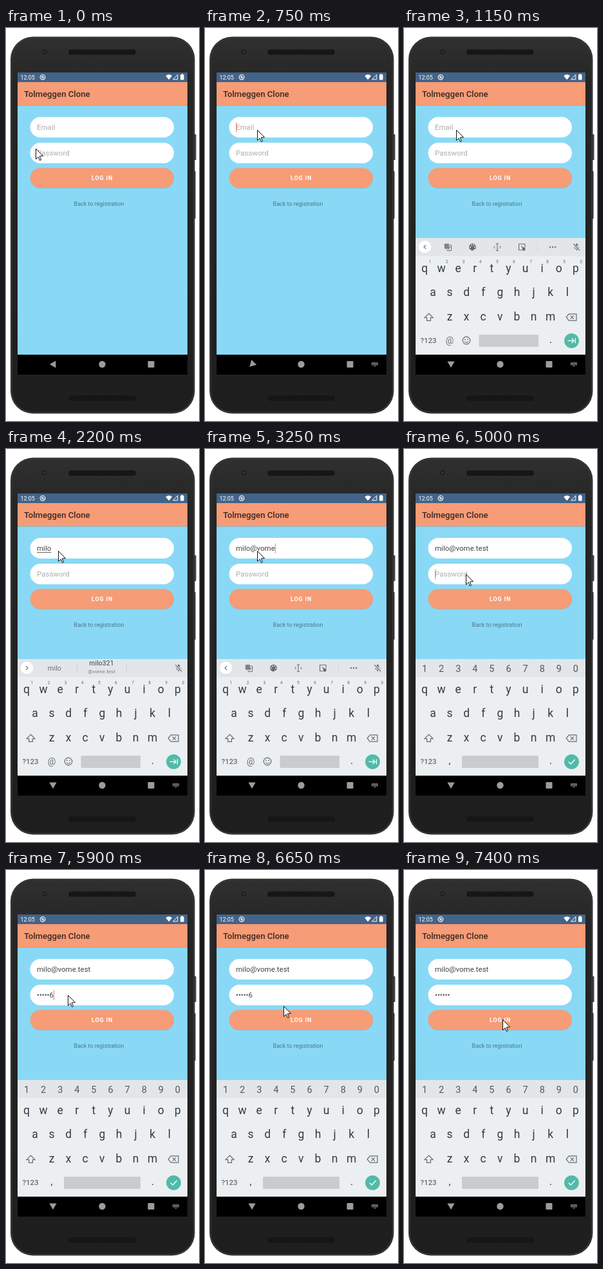
An HTML page with a canvas that plays this animation: 300 px wide and 610 px high, repeating every 8000 ms.

```html
<!DOCTYPE html>
<html lang="en">
<head>
<meta charset="utf-8">
<title>Login demo</title>
<style>
  html, body { margin: 0; width: 100%; height: 100%; overflow: hidden; background: #fff; }
  canvas { display: block; width: 300px; height: 610px; }
</style>
</head>
<body>
<canvas id="stage"></canvas>
<script>
const LOOP = 8000, STEP = 50;
const canvas = document.getElementById('stage');
const ctx = canvas.getContext('2d');
const dpr = window.devicePixelRatio || 1;
canvas.width = 300 * dpr;
canvas.height = 610 * dpr;

const ORANGE = '#f69c76', SKY = '#89d9f6', INK = '#343b3f', GREY = '#666d71';
const HINT = '#adadad', ENTRY = '#444';
const NAV_TOP = 507;

// Each entry is the time at which the next character lands.
const EMAIL = 'milo@vome.test';
const emailTimes = [1600, 1650, 1700, 1750, 2600, 2850, 2950, 3100, 3250, 3400, 3550, 3650, 3700, 3800];
const PASS = '123456';
const passTimes = [5500, 5600, 5750, 5800, 5850, 5900];
const FOCUS_EMAIL = 700, FOCUS_PASS = 4950, PASS_KEYS = 5000;
const resets = [FOCUS_EMAIL, ...emailTimes, FOCUS_PASS, ...passTimes];

const moves = [
  { from: 50, to: 600, a: [46, 187], b: [81, 158] },
  { from: 4450, to: 4950, a: [81, 158], b: [96, 194] },
  { from: 6300, to: 7050, a: [96, 194], b: [153, 232] }
];

const clamp = v => Math.max(0, Math.min(1, v));
const span = (t, a, b) => clamp((t - a) / (b - a));
const smooth = p => p * p * (3 - 2 * p);
const typed = (times, t) => times.filter(x => x <= t).length;

function box(x, y, w, h, r, fill) {
  ctx.beginPath();
  ctx.roundRect(x, y, w, h, r);
  ctx.fillStyle = fill;
  ctx.fill();
}

function disc(x, y, r, fill) {
  ctx.beginPath();
  ctx.arc(x, y, r, 0, Math.PI * 2);
  ctx.fillStyle = fill;
  ctx.fill();
}

function arc(x, y, r, from, to, color, width = 1) {
  ctx.beginPath();
  ctx.arc(x, y, r, from, to);
  ctx.strokeStyle = color;
  ctx.lineWidth = width;
  ctx.stroke();
}

const ring = (x, y, r, color, width) => arc(x, y, r, 0, Math.PI * 2, color, width);

function trace(points, close) {
  ctx.beginPath();
  points.forEach(([x, y], i) => i ? ctx.lineTo(x, y) : ctx.moveTo(x, y));
  if (close) ctx.closePath();
}

function line(points, color, width = 1, close = false) {
  trace(points, close);
  ctx.strokeStyle = color;
  ctx.lineWidth = width;
  ctx.stroke();
}

function poly(points, fill) {
  trace(points, true);
  ctx.fillStyle = fill;
  ctx.fill();
}

function text(s, x, y, size, color, { weight = 400, align = 'left', spacing = 0 } = {}) {
  ctx.font = `${weight} ${size}px Roboto, Arial, sans-serif`;
  ctx.letterSpacing = spacing + 'px';
  ctx.textAlign = align;
  ctx.fillStyle = color;
  ctx.fillText(s, x, y);
  const width = ctx.measureText(s).width;
  ctx.letterSpacing = '0px';
  return width;
}

const label = (s, x, y, size, color, weight) => text(s, x, y, size, color, { align: 'center', weight });

function drawPhone() {
  box(291, 165, 4.6, 40, 1, '#454545');
  box(291, 222, 3.6, 74, 1, '#333');
  const shell = ctx.createLinearGradient(0, 13, 0, 599);
  shell.addColorStop(0, '#303030');
  shell.addColorStop(0.12, '#262626');
  shell.addColorStop(1, '#1e1e1e');
  box(7, 13.5, 286.5, 585, 35, '#2a2a2a');
  box(8, 14.5, 284.5, 583, 34, '#383838');
  box(9.5, 16, 281.5, 580, 32.5, shell);
  disc(60, 37, 3.6, '#1d1d1d');
  disc(60, 37, 1.5, '#3c4044');
  for (const y of [33.5, 570.5]) {
    box(97.5, y, 104, 8, 3, '#141414');
    ctx.fillStyle = '#262626';
    for (let x = 100; x < 199; x += 3) {
      ctx.fillRect(x, y + 2, 1, 1);
      ctx.fillRect(x + 1.5, y + 5, 1, 1);
    }
  }
}

function drawStatus() {
  ctx.fillStyle = '#436389';
  ctx.fillRect(18, 69, 264, 15);
  text('12:05', 22.5, 79.7, 9, '#fff');
  ring(57, 76.3, 3.8, '#fff', 1.2);
  ring(57, 76.3, 1.4, '#fff', 1);
  line([[54.8, 74], [59.2, 78.6]], '#fff', 0.9);
  ctx.beginPath();
  ctx.moveTo(253.2, 80.3);
  ctx.lineTo(248.2, 74.2);
  ctx.quadraticCurveTo(253.2, 70.2, 258.2, 74.2);
  ctx.closePath();
  ctx.fillStyle = '#fff';
  ctx.fill();
  line([[266.8, 72.4], [266.8, 79.8], [259.6, 79.8]], '#fff', 1, true);
  box(271, 72.3, 5.6, 8.2, 0.8, '#fff');
  ctx.fillRect(272.6, 71.3, 2.4, 1.4);
}

function drawPage(t) {
  ctx.fillStyle = SKY;
  ctx.fillRect(18, 84, 264, NAV_TOP - 84);
  ctx.fillStyle = 'rgba(60,90,100,.22)';
  ctx.fillRect(18, 120, 264, 1);
  ctx.fillStyle = ORANGE;
  ctx.fillRect(18, 84, 264, 36);
  text('Tolmeggen Clone', 28, 106.7, 13.2, '#3c2923', { weight: 500 });

  box(37.5, 138, 223.5, 32, 16, '#fff');
  box(37.5, 178, 223.5, 32, 16, '#fff');
  box(38, 218, 223, 31, 15.5, 'rgba(50,90,110,.2)');
  box(37.5, 217.3, 223.5, 31, 15.5, ORANGE);
  text('LOG IN', 133, 236.3, 9, '#fff', { weight: 700, spacing: 0.85 });
  label('Back to registration', 144.5, 276.2, 9, '#4b7687');

  drawFields(t);
}

function drawFields(t) {
  const count = typed(emailTimes, t);
  const passCount = typed(passTimes, t);
  let emailW = 0, passW = 0;
  if (count) {
    emailW = text(EMAIL.slice(0, count), 48, 158.4, 11.5, ENTRY);
    if (count < 5) {
      ctx.fillStyle = '#666';
      ctx.fillRect(48, 160, emailW, 1);
    }
  } else {
    text('Email', 48, 158.4, 11.5, HINT);
  }
  if (passCount) {
    const shown = t < passTimes[passCount - 1] + 1500;
    const dots = '•'.repeat(passCount - (shown ? 1 : 0));
    passW = text(dots + (shown ? PASS[passCount - 1] : ''), 48, 198.4, 11.5, ENTRY);
  } else {
    text('Password', 48, 198.4, 11.5, HINT);
  }

  const last = resets.filter(x => x <= t).pop();
  if (last === undefined || t < 750 || t >= 7400 || (t - last) % 1000 >= 450) return;
  const inPass = t >= FOCUS_PASS;
  ctx.fillStyle = '#ee8f86';
  ctx.fillRect(48 + (inPass ? passW : emailW), inPass ? 186.5 : 146.5, 1.2, 15.5);
}

function drawNav(t) {
  ctx.fillStyle = '#000';
  ctx.fillRect(18, NAV_TOP, 264, 538 - NAV_TOP);
  const turn = t < 750 ? 0 : t < 850 ? 0.5 : 0.5 + 0.5 * span(t, 800, 950);
  ctx.save();
  ctx.translate(73, 522);
  ctx.rotate(-turn * Math.PI / 2);
  poly([[-5.2, 0], [4.4, -5.6], [4.4, 5.6]], '#9c9c9c');
  ctx.restore();
  disc(149.5, 522, 5.2, '#9c9c9c');
  box(220.5, 517, 10, 10, 1, '#9c9c9c');
  if (t < 750) return;
  box(259, 519, 10, 4.6, 0.6, '#777');
  ctx.fillStyle = '#111';
  for (let i = 0; i < 4; i++) {
    ctx.fillRect(260.2 + i * 2.2, 520, 1, 1);
    ctx.fillRect(260.2 + i * 2.2, 521.8, 1, 1);
  }
  poly([[262, 524.3], [266, 524.3], [264, 526.3]], '#777');
}

function drawMic() {
  box(266.6, 334.5, 3.6, 6.5, 1.8, GREY);
  arc(268.4, 339.5, 3.8, 0.1, Math.PI - 0.1, GREY);
  line([[268.4, 343], [268.4, 345.5]], GREY);
  line([[263.8, 334.6], [273.6, 345]], '#e3e6e8', 2.4);
  line([[263.4, 335], [273.2, 345.4]], GREY, 1.1);
}

function drawTools() {
  box(62.8, 334.8, 7.2, 8, 0.8, '#7d8386');
  line([[70.6, 337], [73.6, 337], [73.6, 345.6], [67.5, 345.6], [66.6, 343.6]], GREY);
  line([[69.6, 340], [72.4, 340]], GREY, 0.9);
  line([[71.6, 340], [69.2, 344]], GREY, 0.9);

  disc(106.5, 340, 5.4, GREY);
  for (const [x, y] of [[103.2, 340], [105, 337], [108.2, 337], [110, 340], [109, 344.2]])
    disc(x, y, 1, '#e3e6e8');

  line([[145, 335], [145, 345.5]], GREY, 1.1);
  line([[143, 334.8], [147, 334.8]], GREY);
  line([[143, 345.6], [147, 345.6]], GREY);
  line([[141.6, 338.2], [139.8, 340.2], [141.6, 342.2]], GREY);
  line([[148.4, 338.2], [150.2, 340.2], [148.4, 342.2]], GREY);

  line([[188, 340], [188, 335.2], [178.6, 335.2], [178.6, 344.8], [183, 344.8]], GREY, 1.1);
  box(183.8, 340.6, 4.6, 5, 1, GREY);
  line([[182.4, 338.4], [185.4, 342]], GREY, 1.2);

  ctx.fillStyle = '#d5d8da';
  ctx.fillRect(207, 332, 1, 16);
  for (const x of [227, 231, 235]) disc(x, 340, 1.2, GREY);
}

function drawStrip(t) {
  const suggest = t >= 2100 && t < 2600;
  disc(32.5, 340.4, 10, '#d3d6d8');
  disc(32.5, 339.8, 9.8, '#fff');
  const d = suggest ? 1.5 : -1.5;
  line([[32.5 - d, 336.8], [32.5 + d, 339.8], [32.5 - d, 342.8]], GREY, 1.2);
  drawMic();
  if (!suggest) return drawTools();
  label('milo', 75.5, 344, 11, '#697176');
  label('milo321', 148.5, 336.4, 10.5, '#5f676c', 500);
  label('@vome.test', 148.5, 347.6, 8, '#7b8387');
  ctx.fillStyle = '#d0d3d5';
  ctx.fillRect(110, 332, 1, 16);
  ctx.fillRect(187, 332, 1, 16);
}

function drawKeys(pass) {
  [...'qwertyuiop'].forEach((c, i) => {
    const x = 32 + i * 26.1, digit = String((i + 1) % 10);
    label(c, x, 379, 17.5, INK);
    if (pass) label(digit, x, 345.8, 14.5, '#50575b');
    else label(digit, x + 8.4, 364.6, 6.6, GREY);
  });
  [...'asdfghjkl'].forEach((c, i) => label(c, 45 + i * 26.1, 416.3, 17.5, INK));
  [...'zxcvbnm'].forEach((c, i) => label(c, 71 + i * 26.1, 454.3, 17.5, INK));

  line([[38.5, 443], [45, 449.6], [41.4, 449.6], [41.4, 454.4], [35.6, 454.4], [35.6, 449.6], [32, 449.6]], GREY, 1.2, true);
  line([[252.2, 449], [256.4, 443.8], [268, 443.8], [268, 454.2], [256.4, 454.2]], GREY, 1.2, true);
  line([[258.8, 446.4], [264, 451.6]], GREY, 1.2);
  line([[264, 446.4], [258.8, 451.6]], GREY, 1.2);

  label('?123', 38, 489.4, 11.5, GREY, 500);
  label('.', 228, 489.2, 16, INK);
  disc(260.5, 485.4, 11.4, '#51baa9');
  if (pass) {
    label(',', 71, 489.2, 15, INK);
    box(90, 476, 119, 19, 1.5, '#c8cccf');
    line([[255.8, 485.6], [259.2, 489], [265.6, 482]], '#fff', 1.4);
  } else {
    label('@', 71, 490.2, 14, GREY);
    ring(97, 485, 5.8, GREY, 1.2);
    disc(94.9, 483.4, 0.9, GREY);
    disc(99.1, 483.4, 0.9, GREY);
    arc(97, 485.6, 2.8, 0.3, Math.PI - 0.3, GREY, 1.1);
    box(116.5, 476, 92.5, 19, 1.5, '#c8cccf');
    line([[254.4, 485.4], [264, 485.4]], '#fff', 1.3);
    line([[260.6, 481.8], [264.2, 485.4], [260.6, 489]], '#fff', 1.3);
    line([[266.4, 481.4], [266.4, 489.4]], '#fff', 1.3);
  }
}

function drawKeyboard(t) {
  const p = span(t, 800, 1050);
  if (!p) return;
  const pass = t >= PASS_KEYS, height = NAV_TOP - 326;
  ctx.save();
  ctx.beginPath();
  ctx.rect(18, 326, 264, height);
  ctx.clip();
  ctx.globalAlpha = clamp(p * 1.6);
  ctx.translate(0, 90 * Math.pow(1 - p, 2));
  ctx.fillStyle = '#ebeff1';
  ctx.fillRect(18, 326, 264, height);
  ctx.fillStyle = '#e3e6e8';
  ctx.fillRect(18, 326, 264, 28);
  if (!pass) drawStrip(t);
  drawKeys(pass);
  ctx.restore();
}

function drawPointer(t) {
  let [x, y] = moves[0].a;
  for (const m of moves) {
    if (t < m.from) break;
    const p = smooth(span(t, m.from, m.to));
    x = m.a[0] + (m.b[0] - m.a[0]) * p;
    y = m.a[1] + (m.b[1] - m.a[1]) * p;
  }
  ctx.save();
  ctx.translate(Math.round(x) + 0.5, Math.round(y) + 0.5);
  const arrow = [[0, 0], [0, 16], [3.6, 12.6], [6, 18], [8, 17.2], [5.8, 11.5], [11, 11.2]];
  poly(arrow, '#fff');
  line(arrow, '#111', 1, true);
  ctx.restore();
}

function frame(now) {
  const t = Math.floor((now % LOOP) / STEP) * STEP;
  ctx.setTransform(dpr, 0, 0, dpr, 0, 0);
  ctx.fillStyle = '#fff';
  ctx.fillRect(0, 0, 300, 610);
  drawPhone();
  drawStatus();
  drawPage(t);
  drawKeyboard(t);
  drawNav(t);
  drawPointer(t);
}

let start;
function tick(now) {
  start ??= now;
  frame(Math.max(0, now - start));
  requestAnimationFrame(tick);
}
frame(0);
requestAnimationFrame(tick);
</script>
</body>
</html>
```
